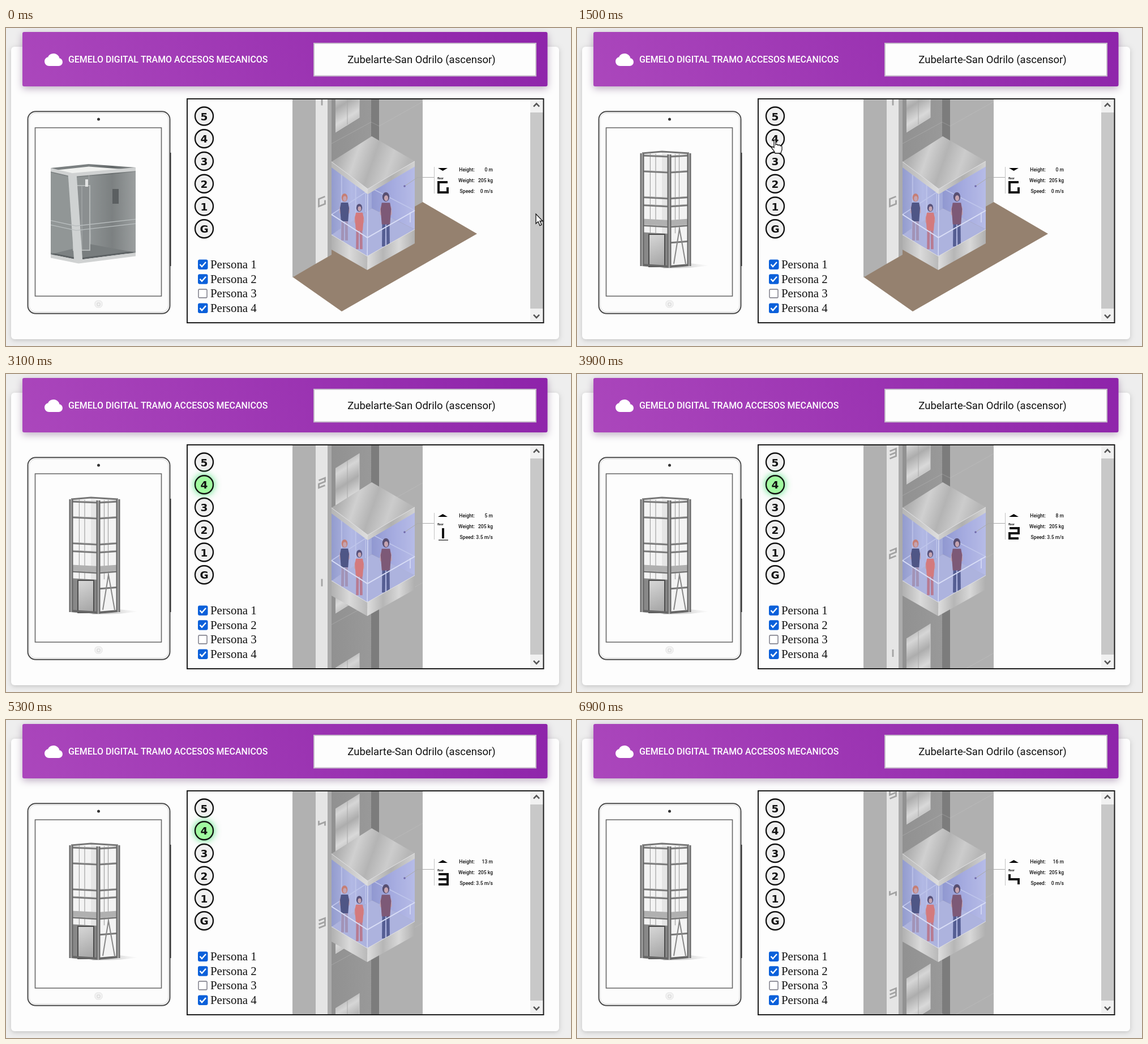
An HTML page with a canvas for the animation above (7 s loop, 998 by 561 pixels).

```html
<!DOCTYPE html>
<html lang="es">
<head>
<meta charset="utf-8">
<title>Gemelo digital</title>
<style>
html, body { margin: 0; width: 100%; height: 100%; overflow: hidden; background: #eee; }
canvas { display: block; width: 998px; height: 561px; }
</style>
</head>
<body>
<canvas id="stage" width="998" height="561"></canvas>
<script>
const ctx = document.getElementById('stage').getContext('2d');
const LOOP = 7000, FLOOR = 176, TOP = 4 * FLOOR;
const START = 1570, SPEED = 0.1555, LIGHT_OFF = 6500, SWAP = 750;
const LEVELS = ['G', '1', '2', '3', '4', '5'];

const clamp = (v, a, b) => Math.min(b, Math.max(a, v));
const mix = (a, b, u) => a + (b - a) * u;
const between = (p, q, u) => [mix(p[0], q[0], u), mix(p[1], q[1], u)];
const ease = u => u * u * (3 - 2 * u);

function trace(pts) {
  ctx.beginPath();
  pts.forEach(p => ctx.lineTo(...p));
}
function poly(fill, ...pts) {
  trace(pts);
  ctx.fillStyle = fill;
  ctx.fill();
}
function line(color, width, ...pts) {
  trace(pts);
  ctx.strokeStyle = color;
  ctx.lineWidth = width;
  ctx.stroke();
}
function rect(fill, x, y, w, h) {
  ctx.fillStyle = fill;
  ctx.fillRect(x, y, w, h);
}
function round(x, y, w, h, r, fill, stroke, width = 1) {
  ctx.beginPath();
  ctx.roundRect(x, y, w, h, r);
  if (fill) { ctx.fillStyle = fill; ctx.fill(); }
  if (stroke) { ctx.strokeStyle = stroke; ctx.lineWidth = width; ctx.stroke(); }
}
function oval(fill, x, y, rx, ry = rx) {
  ctx.beginPath();
  ctx.ellipse(x, y, rx, ry, 0, 0, Math.PI * 2);
  ctx.fillStyle = fill;
  ctx.fill();
}
function text(s, x, y, font, align = 'left', color = '#111') {
  ctx.font = font;
  ctx.fillStyle = color;
  ctx.textAlign = align;
  ctx.fillText(s, x, y);
}
function grad(x0, y0, x1, y1, ...colors) {
  const g = ctx.createLinearGradient(x0, y0, x1, y1);
  colors.forEach((c, i) => g.addColorStop(i / (colors.length - 1), c));
  return g;
}
function shadow(color, blur, dy, draw) {
  ctx.save();
  ctx.shadowColor = color;
  ctx.shadowBlur = blur;
  ctx.shadowOffsetY = dy;
  draw();
  ctx.restore();
}

// A box seen from a corner: Left, Front, Right and Back edges run from top to bottom.
class Box {
  constructor(edges) { this.edges = edges; }
  at(edge, v) {
    const [x0, y0, x1, y1] = this.edges[edge];
    return [mix(x0, x1, v), mix(y0, y1, v)];
  }
  ring(edges, v) { return [...edges].map(e => this.at(e, v)); }
  face(fill, edges, v0, v1) {
    poly(fill, ...this.ring(edges, v0), ...this.ring(edges, v1).reverse());
  }
  plane(fill, v) { poly(fill, ...this.ring('LFRB', v)); }
  rail(color, width, edges, v) { line(color, width, ...this.ring(edges, v)); }
  post(color, width, edge, v0 = 0, v1 = 1) { line(color, width, this.at(edge, v0), this.at(edge, v1)); }
}

const car = new Box({
  L: [575, 236, 575, 391], F: [639, 284, 638, 427], R: [722, 235, 722, 380], B: [646, 191, 646, 344]
});
const cabinModel = new Box({
  L: [79, 247, 79, 404], F: [117, 256, 128, 414], R: [229, 246, 229, 401], B: [146, 240, 150, 386]
});
const towerModel = new Box({
  L: [115, 221, 115, 420], F: [163, 223, 163, 423], R: [198, 221, 198, 420], B: [150, 218, 150, 405]
});

function drawPage() {
  rect('#eeeeee', 0, 0, 998, 561);
  shadow('rgba(0,0,0,.18)', 8, 2, () => round(9, 33, 968, 516, 6, '#fdfdfd'));
  const purple = grad(124, 268, 860, -158, '#ab47bc', '#8e24aa');
  shadow('rgba(70,25,85,.35)', 14, 4, () => round(29, 7, 927.5, 96, 3, purple));
  ctx.fillStyle = '#fff';
  ctx.beginPath();
  ctx.arc(76, 59, 8, Math.PI / 2, Math.PI * 1.6);
  ctx.arc(84, 56, 11, Math.PI * 1.15, Math.PI * 1.9);
  ctx.arc(93, 60, 7, Math.PI * 1.5, Math.PI / 2);
  ctx.fill();
  text('GEMELO DIGITAL TRAMO ACCESOS MECANICOS', 110, 61, '500 15.95px Roboto, sans-serif', 'left', '#fff');
  round(544, 27, 392, 57.5, 0, '#fdfdfd', '#c6bcca', 2);
  text('Zubelarte-San Odrilo (ascensor)', 734, 62, '18.5px Roboto, sans-serif', 'center');
}

function drawTablet() {
  round(38.5, 147.3, 251, 356.5, 14, '#fcfcfc', '#4c4c4c', 2);
  round(41, 150, 246, 351, 12, null, '#d8d8d8');
  line('#333', 2, [290.5, 220], [290.5, 420]);
  oval('#333', 163.5, 161, 2.5);
  round(51.5, 176, 223, 297, 0, '#fdfdfd', '#666', 1.6);
  round(157, 481, 13, 12, 5, '#f3f3f3', '#e2e2e2');
  round(161, 485, 5, 5, 1, null, '#d0d0d0');
}

function drawCabinModel() {
  const m = cabinModel;
  m.face('#7b8081', 'LB', 0, 1);
  m.face(grad(146, 0, 229, 0, '#7d8283', '#626768', '#8d9192'), 'BR', 0, 1);
  m.plane('#5d6264', 0.97);
  round(119, 278, 29, 114, 0, '#777b7c', '#aeb2b2', 2);
  line('#a5a9aa', 1, [134, 279], [134, 392]);
  rect('#f0f0f0', 140, 267, 5, 13);
  rect('#34393b', 188, 284, 11, 26);
  m.face('rgba(190,194,195,.28)', 'FR', 0.05, 0.95);
  m.face('rgba(195,198,199,.3)', 'LF', 0.05, 0.95);
  m.plane('#f0f1ef', 0.03);
  m.post('#cfd2d2', 15, 'F', 0.02, 0.97);
  for (const v of [0, 0.97]) m.face('#d0d2d2', 'LFR', v, v + 0.04);
  for (const v of [0.59, 0.64]) m.rail('#b9bebf', 1.3, 'LFR', v);
}

function drawTowerModel() {
  const m = towerModel;
  poly(grad(180, 0, 235, 0, 'rgba(90,90,90,.35)', 'rgba(160,160,160,0)'), [150, 424], [190, 414], [235, 419], [200, 423]);
  m.face('#f3f3f3', 'LFR', 0, 1);
  m.face('rgba(170,170,170,.2)', 'BF', 0, 0.9);
  for (const u of [0.3, 0.5]) {
    for (const [a, b] of ['LF', 'FR']) {
      line('#a2a2a2', 1.2, between(m.at(a, 0), m.at(b, 0), u), between(m.at(a, 0.7), m.at(b, 0.7), u));
    }
  }
  for (const v of [0.02, 0.16, 0.39, 0.46, 0.64]) {
    m.rail('#777', 3, 'LFR', v);
    m.rail('#b8b8b8', 1, 'LFR', v - 0.008);
  }
  m.face('#b0b0b0', 'LFR', 0.58, 0.63);
  m.face('#888', 'LF', 0.7, 1);
  m.rail('#777', 3, 'FR', 0.78);
  round(127, 364, 28, 57, 0, grad(127, 364, 155, 421, '#d8d8d8', '#a2a2a2'), '#4d4d4d', 2);
  line('#888', 2, [171, 416], [181, 354], [192, 416]);
  m.rail('#666', 4, 'LFR', 0.99);
  m.rail('#777', 3, 'LBR', 0);
  for (const edge of 'LFR') {
    m.post('#686868', 7, edge);
    m.post('#a4a4a4', 2.5, edge);
  }
}

// Signs are strokes over a grid of two columns and three rows; 6 and 7 are its middle.
const STROKES = { G: '10453', 1: '67', 2: '013245', 3: '0132354', 4: '0235', 5: '102354' };
function sign(level, color, x, y, w, h, skew) {
  const pts = [...STROKES[level]].map(n => {
    const col = n > 5 ? 0.5 : n % 2, row = n > 5 ? (n - 6) * 2 : n >> 1;
    return [x + (col - 0.5) * w, y + (row - 1) * h / 2 - (col - 0.5) * w * skew];
  });
  line(color, w / 4, ...pts);
}

function drawShaft(off) {
  const base = (x, y) => [x, y + off];
  const wall = (fill, x0, y0, x1, y1) => poly(fill, [x0, 120], [x1, 120], base(x1, y1), base(x0, y0));
  const repeat = (y0, draw) => LEVELS.forEach((_, k) => draw(y0 + off - k * FLOOR));

  poly('#95816f', base(506, 439), base(593, 500), base(832, 363), base(736, 307), base(645, 300));
  wall('#b0b0b0', 658, 351, 736, 307);
  wall('#7c7c7c', 645, 344, 659, 351);
  const back = grad(575, 0, 645, 0, '#919191', '#999');
  wall(back, 574, 386, 645, 344);
  repeat(356, y => {
    const metal = grad(578, y - 90, 628, y - 10, '#a9a9a9', '#d6d6d6', '#adadad', '#d9d9d9', '#b2b2b2');
    poly(metal, [582, y - 76], [624, y - 102], [624, y - 22], [582, y + 4]);
    line('#a8a8a8', 1, [603, y - 89], [603, y - 9]);
    line('#cfcfcf', 1, [582, y + 4], [624, y - 22], [624, y - 102]);
  });
  repeat(166, y => line('rgba(205,205,205,.3)', 1, [575, y + 38], [645, y], [659, y + 7], [736, y - 36]));
  wall('#b1b1b1', 506, 440, 547, 416);
  wall('#e5e5e5', 547, 416, 568, 404);
  wall('#ababab', 568, 404, 575, 400);
  LEVELS.forEach((level, i) => sign(level, '#a2a2a2', 558, 306 + off - i * FLOOR, 11, 13, 0.4));
}

function person(x, y, scale, hair, top, legs) {
  const skin = '#cfa3a6';
  ctx.save();
  ctx.translate(x, y);
  ctx.scale(scale, scale);
  for (const side of [-1, 1]) {
    line(legs, 5.5, [side * 3.5, 38], [side * 4, 84]);
    line(skin, 2.5, [side * 8, 16], [side * 9, 28], [side * 3, 36]);
  }
  poly(top, [-7, 9], [7, 9], [9, 20], [7, 46], [-7, 46], [-9, 20]);
  oval(hair, 0, -1, 6, 8);
  oval(skin, 0.5, 1, 3.5, 5);
  ctx.restore();
}

function drawCar() {
  const GLASS = 0.065, BASE = 0.83;
  car.face(grad(575, 0, 646, 0, '#929acb', '#b9bfe8', '#a4abd9'), 'LB', GLASS, BASE);
  car.face(grad(646, 0, 722, 0, '#8f96cf', '#a9aee2', '#bec2ea'), 'BR', GLASS, BASE);
  car.plane('#b3b8e0', BASE);
  for (const u of [0.25, 0.6, 0.85]) {
    line('rgba(205,211,242,.7)', 2, between(car.at('L', GLASS), car.at('B', GLASS), u),
      between(car.at('L', BASE), car.at('B', BASE), u));
  }
  car.rail('#c9cff0', 1.5, 'LBR', 0.6);
  person(598, 300, 0.89, '#d0765c', '#3d4472', '#a58fae');
  person(624, 318, 0.86, '#473d62', '#e27166', '#bf7280');
  person(671, 299, 1.03, '#473a58', '#77475f', '#454d82');
  car.face('rgba(150,158,212,.2)', 'LFR', GLASS, BASE);
  car.post('#d5daf5', 1.5, 'F', GLASS, BASE);
  car.rail('#d9def6', 2, 'LFR', 0.6);
  line('#d9def6', 1.5, [714, 325], [714, 343]);

  car.plane(grad(590, 215, 705, 255, '#adadad', '#d0d0d0', '#b4b4b4', '#cccccc', '#b6b6b6'), 0);
  car.face(grad(575, 0, 639, 0, '#b5b5b5', '#dedede'), 'LF', 0, GLASS);
  car.face(grad(639, 0, 722, 0, '#d1d1d1', '#b0b0b0', '#d2d2d2'), 'FR', 0, GLASS);
  car.face(grad(575, 0, 638, 0, '#b0b0b0', '#dadada', '#b9b9b9'), 'LF', BASE, 1);
  car.face(grad(638, 0, 722, 0, '#dedede', '#b6b6b6', '#d8d8d8', '#afafaf'), 'FR', BASE, 1);
  for (const v of [0, BASE]) car.rail('#e2e2e2', 1, 'LFR', v);
}

function drawInfo(off, moving, up) {
  line('#aaa', 1, [704, 279], [727, 263.5], [756, 263.5]);
  line('#c4c4c4', 1, [756.5, 245], [756.5, 292]);
  oval('#6f68aa', 704, 279, 1.8);
  const dir = up ? 1 : -1;
  poly('#000', [763, 249.5 + 2.5 * dir], [771.5, 249.5 - 2.5 * dir], [780, 249.5 + 2.5 * dir]);
  text('floor', 762, 267, 'bold 5px Roboto, sans-serif');
  const level = LEVELS[Math.round(off / FLOOR)];
  sign(level, '#111', 772, 281, 16, 18, 0);
  if (level === '1') line('#111', 1.2, [764, 293], [781, 293]);
  const rows = [
    ['Height:', Math.round(off / 44) + ' m'],
    ['Weight:', '205 kg'],
    ['Speed:', (moving ? '3.5' : '0') + ' m/s']
  ];
  rows.forEach(([name, value], i) => {
    const y = 253 + i * 19, font = '500 8.6px Roboto, sans-serif';
    text(name, 828, y, font, 'right');
    text(value, 860, y, font, 'right');
  });
}

function drawControls(lit) {
  [...LEVELS].reverse().forEach((label, i) => {
    const y = 155.5 + i * 39.75, on = lit && label === '4';
    if (on) shadow('#3fe06f', 13, 0, () => oval('#9cf59c', 350, y, 17));
    round(334, y - 16, 32, 32, 16, on ? '#a0faa0' : '#f0f0f0', '#111', 2.3);
    text(label, 350, y + 7, 'bold 18.5px "DejaVu Sans", sans-serif', 'center');
  });
  for (let i = 0; i < 4; i++) {
    const y = 417 + i * 25.7;
    if (i === 2) round(340, y - 7.5, 15, 15, 2, '#fff', '#858590', 1.6);
    else {
      round(339, y - 8.5, 17.5, 17.5, 3, '#0b60da');
      line('#fff', 2.4, [342.5, y], [346, y + 4], [353, y - 4]);
    }
    text('Persona ' + (i + 1), 361, y + 7, '20.9px "Liberation Serif", serif');
  }
}

function drawScrollbar() {
  rect('#f1f1f1', 926, 126, 23, 393);
  rect('#c8c8c8', 926, 149, 23, 346);
  for (const [y, d] of [[136, 1], [508.5, -1]]) {
    line('#555', 2.6, [932, y + 2.7 * d], [937, y - 2.7 * d], [942, y + 2.7 * d]);
  }
}

const ARROW = new Path2D('M0 0V17L4 13.5 7 20.5 10 19 7 12.5H12Z');
const HAND = new Path2D('M4 1Q6-1 7 2V9Q10 7 11 10 14 8 15 11 18 10 18 13V18Q17 20 16 24H6Q4 19 0 15 0 12 3 13L4 14Z');
const REST = [936, 328], BUTTON = [349, 197], ASIDE = [511, 367];

function drawCursor(t) {
  if (t > 3000) return;
  const reach = ease(clamp((t - 350) / 900, 0, 1));
  const leave = ease(clamp((t - 1650) / 600, 0, 1));
  const [x, y] = between(between(REST, BUTTON, reach), ASIDE, leave);
  const hover = Math.hypot(x - 350, y - 195) < 17;
  const shape = hover ? HAND : ARROW;
  ctx.save();
  ctx.translate(hover ? x - 5 : x, y);
  ctx.fillStyle = '#fff';
  ctx.strokeStyle = '#111';
  ctx.lineWidth = 1.3;
  ctx.fill(shape);
  ctx.stroke(shape);
  ctx.restore();
}

function draw(t) {
  const off = clamp((t - START) * SPEED, 0, TOP);
  const started = t >= START;
  drawPage();
  drawTablet();
  if (t < SWAP) drawCabinModel();
  else drawTowerModel();
  ctx.save();
  ctx.beginPath();
  ctx.rect(320, 126, 629, 393);
  ctx.clip();
  drawShaft(off);
  drawCar();
  drawInfo(off, started && off < TOP, started);
  drawControls(started && t < LIGHT_OFF);
  drawScrollbar();
  ctx.restore();
  round(320, 125, 629.5, 395, 0, null, '#1c1c1c', 2);
  drawCursor(t);
}

const begin = performance.now();
function frame() {
  draw((performance.now() - begin) % LOOP);
  requestAnimationFrame(frame);
}
frame();
</script>
</body>
</html>
```
